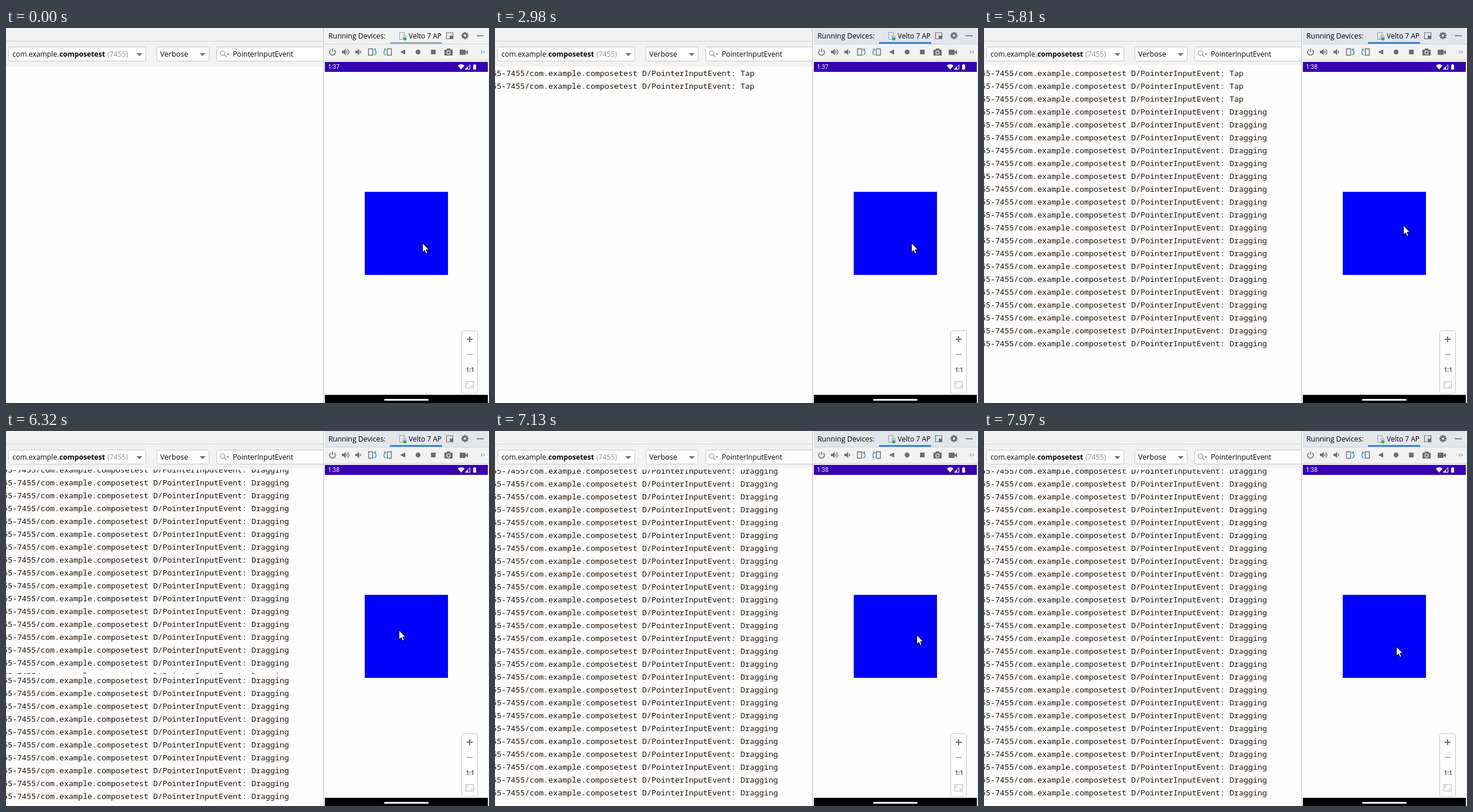
Write an HTML page with a canvas that moves like this. It is 824x641 px and loops after 8000 ms.

```html
<!DOCTYPE html>
<html lang="en">
<head>
<meta charset="utf-8">
<title>Pointer input log</title>
<style>
html, body { margin: 0; width: 100%; height: 100%; overflow: hidden; background: #f2f2f2; }
canvas { display: block; }
</style>
</head>
<body>
<canvas id="stage" width="824" height="641"></canvas>
<script>
const ctx = document.getElementById('stage').getContext('2d', { alpha: false });
const LOOP = 8000;
const UI = '"Open Sans", "Noto Sans", sans-serif';
const MONO = '13.333px "Noto Sans Mono", "DejaVu Sans Mono", monospace';
const GREY = '#6e6e6e', PALE = '#b8b8b8', BLUE = '#389fd6', LINE = '#d1d1d1';
const ROW = 22, LOG_TOP = 66, LOG_RIGHT = 541, BOTTOM = 641;
const FOCUS = 1370, DRAG = 5540;
const TAPS = [1770, 2980, 4340];

// Turning points of the pointer: time, tip x, tip y
const TURNS = [
  [5000, 710, 367], [5810, 715, 337], [6320, 670, 340], [6830, 706, 381],
  [7130, 719, 348], [7620, 676, 362], [7970, 703, 368]
];

// Screen updates come at three paces, on a 30 ms grid.
const snap = ms => 20 + 30 * Math.floor((ms - 20) / 30);
const pace = (from, step, count) => Array.from({ length: count }, (_, i) => snap(from + step * i));
const ticks = [...pace(5150, 135, 6), ...pace(5960, 120, 7), ...pace(6850, 143.3, 9)];

const tickIndex = t => ticks.filter(tick => tick <= t).length - 1;

function cursorAt(time) {
  const next = TURNS.findIndex(turn => turn[0] >= time);
  if (next === 0) return TURNS[0].slice(1);
  const [t0, x0, y0] = TURNS[next - 1], [t1, x1, y1] = TURNS[next];
  const k = (1 - Math.cos(Math.PI * (time - t0) / (t1 - t0))) / 2;
  return [Math.round(x0 + (x1 - x0) * k), Math.round(y0 + (y1 - y0) * k)];
}

function rect(x, y, w, h, color) {
  ctx.fillStyle = color;
  ctx.fillRect(x, y, w, h);
}
function text(str, x, y, font, color = '#000') {
  ctx.font = font;
  ctx.fillStyle = color;
  ctx.fillText(str, x, y);
}
function fill(d, color) {
  ctx.fillStyle = color;
  ctx.fill(new Path2D(d));
}
function path(d, color, width = 1.3) {
  ctx.strokeStyle = color;
  ctx.lineWidth = width;
  ctx.stroke(new Path2D(d));
}
function disc(x, y, r, color) {
  ctx.beginPath();
  ctx.arc(x, y, r, 0, Math.PI * 2);
  ctx.fillStyle = color;
  ctx.fill();
}
function arc(x, y, r, a, b, color, width = 1.3) {
  ctx.beginPath();
  ctx.arc(x, y, r, a, b);
  ctx.strokeStyle = color;
  ctx.lineWidth = width;
  ctx.stroke();
}
function field(x, y, w, h) {
  ctx.beginPath();
  ctx.roundRect(x + .5, y + .5, w - 1, h - 1, 3);
  ctx.fillStyle = '#fff';
  ctx.fill();
  ctx.strokeStyle = '#c4c4c4';
  ctx.lineWidth = 1;
  ctx.stroke();
}
const arrowDown = (x, y, r) => fill(`M${x - r} ${y} h${2 * r} l${-r} ${r} Z`, GREY);

function filterBar() {
  rect(0, 22, LOG_RIGHT, 1, LINE);
  field(4, 32, 235, 25);
  text('com.example.', 11, 49, '12.2px ' + UI);
  text('composetest', 91, 49, 'bold 12.2px ' + UI);
  text('(7455)', 173, 49, '12.2px ' + UI, '#8c8c8c');
  arrowDown(227.5, 43, 5);
  field(257, 32, 90, 25);
  text('Verbose', 263, 49, '12.6px ' + UI);
  arrowDown(335.5, 43, 5);
  field(359, 32, 200, 25);
  arc(369.5, 43, 4, 0, 7, '#8a8a8a', 1.2);
  path('M372.5 46 L376 49.5', '#8a8a8a', 1.4);
  arrowDown(378.5, 43.5, 2.5);
  text('PointerInputEvent', 387, 49, '12.2px ' + UI);
}

// Rows are placed by the middle of their text.
function logRows(first, last, top, bottom, taps = 0) {
  ctx.save();
  ctx.beginPath();
  ctx.rect(0, top, LOG_RIGHT, bottom - top);
  ctx.clip();
  for (let y = first, i = 0; y <= last; y += ROW, i++) {
    const kind = i < taps ? 'Tap' : 'Dragging';
    text('55-7455/com.example.composetest D/PointerInputEvent: ' + kind, -5, y + 5, MONO, '#1c1108');
  }
  ctx.restore();
}

function log(t) {
  const top = t < DRAG ? LOG_TOP : LOG_TOP - 3;
  rect(0, top, LOG_RIGHT, BOTTOM - top, '#fefefe');

  const taps = TAPS.filter(tap => tap <= t).length;
  const tick = tickIndex(t), dragTick = tickIndex(DRAG), fullTick = dragTick + 3;
  if (tick <= fullTick) {
    const count = tick < dragTick ? taps : 14 + 4 * (tick - dragTick);
    logRows(77, 77 + ROW * (count - 1), LOG_TOP, BOTTOM, taps);
    return;
  }
  const resting = (t >= 6830 && t < 7280) || t >= 7970;
  if (resting) {
    logRows(68, 618, LOG_TOP, BOTTOM);
    return;
  }
  // While scrolling, some repaints are torn: the lower part lags by 8 px.
  const first = LOG_TOP - (tick - 9 + ROW) * 7 % ROW;
  const tear = tick % 6 === 3 ? 415 : BOTTOM;
  logRows(first, BOTTOM + ROW, LOG_TOP, tear);
  logRows(first + 8, BOTTOM + ROW, tear, BOTTOM);
}

function speaker(x, waves) {
  fill(`M${x} 39 h3 l3.5 -3.5 v11 l-3.5 -3.5 h-3 Z`, GREY);
  for (let i = 0; i < waves; i++) arc(x + 6.5, 41, 2.5 + i * 3, -1, 1, GREY);
}

function rotateIcon(x, side) {
  ctx.save();
  ctx.translate(x, 41);
  ctx.scale(side, 1);
  path('M-6.5 -5.5 H0.5 V5.5 H-6.5 Z', GREY, 1.4);
  path('M3 5 Q7 4 6.3 -.5 Q6 -3 3.5 -4', BLUE, 1.5);
  fill('M2 -4 L5.8 -7 V-1.5 Z', BLUE);
  ctx.restore();
}

function gear(x, y) {
  for (let i = 0; i < 8; i++) {
    ctx.save();
    ctx.translate(x, y);
    ctx.rotate(i * Math.PI / 4);
    rect(-1.4, -6.2, 2.8, 3, GREY);
    ctx.restore();
  }
  arc(x, y, 3.4, 0, 7, GREY, 2.6);
}

function deviceHeader(active) {
  rect(544, 0, 278, 27, active ? '#e2e6ec' : '#f2f2f2');
  text('Running Devices:', 550, 18, '12.3px ' + UI);
  path('M678 19.5 H671.5 V7.5 H679.5 V13 M677.5 19.5 V13.5 H682.5 V16', '#9a9fa5', 1);
  disc(680.5, 18.5, 2.8, '#2fb344');
  text('Velto 7 AP', 687, 18, '12px ' + UI);
  rect(655, 24, 89, 3, active ? '#4083c9' : '#9ca9bb');
  path('M751.5 8 H762.5 V18.5 H751.5 Z', GREY, 1.2);
  rect(757, 13, 5, 5, GREY);
  gear(783, 13);
  rect(803, 12.5, 12, 1.6, GREY);
}

function deviceTools() {
  rect(544, 27, 280, 1, LINE);
  rect(544, 55, 280, 1, LINE);
  arc(557, 41.5, 5, -.9, Math.PI + .9, GREY, 1.6);
  rect(556.2, 35, 1.6, 6, GREY);
  speaker(573, 2);
  speaker(596, 1);
  rotateIcon(625, 1);
  rotateIcon(651, -1);
  fill('M672.5 41 L681 36.5 V45.5 Z', GREY);
  disc(703, 41, 4.2, GREY);
  rect(725, 37, 8, 8, GREY);
  rect(748, 37, 14, 10, GREY);
  rect(752, 35, 6, 3, GREY);
  arc(755, 42, 2.8, 0, 7, '#f2f2f2', 1.2);
  rect(774, 37, 10, 9, GREY);
  fill('M783 41.5 L788 37.5 V45.5 Z', GREY);
  path('M810 38.5 l2.5 2.5 l-2.5 2.5 M814 38.5 l2.5 2.5 l-2.5 2.5', GREY, 1);
}

function phone(t) {
  rect(544, 58, 278, 583, '#fefefe');
  rect(544, 58, 278, 17, '#3700b0');
  text(t < DRAG ? '1:37' : '1:38', 549.5, 70, '10px Roboto, sans-serif', '#fff');
  fill('M776.5 71 L770.8 64.3 Q776.5 59.8 782.2 64.3 Z', '#fff');
  path('M783.8 70.5 L791.5 62.8 V70.5 Z', '#fff', 1);
  fill('M783 71 L788 66 V71 Z', '#fff');
  rect(797, 63, 5, 8, '#fff');
  rect(798.3, 62, 2.4, 1, '#fff');
  rect(612, 280, 142, 142, '#00f');
  rect(544, 627, 278, 14, '#000');
  ctx.beginPath();
  ctx.roundRect(645, 634, 76, 3, 1.5);
  ctx.fillStyle = '#fff';
  ctx.fill();
}

function zoomPanel() {
  field(777, 517, 28, 108);
  rect(786, 531, 10, 2, GREY);
  rect(790, 527, 2, 10, GREY);
  rect(786, 557, 10, 2, PALE);
  text('1:1', 784.5, 588, 'bold 10px ' + UI, '#5e5e5e');
  path('M784.5 604.5 H797.5 V615.5 H784.5 Z', PALE, 1.2);
  path('M787 609.5 V607 H789.5 M795 610.5 V613 H792.5', PALE, 1);
}

function cursor(x, y) {
  const shape = 'M.5 .5 V16.5 L4.1 13 L6.6 18.5 L9.2 17.4 L6.8 12 H11.5 Z';
  ctx.save();
  ctx.translate(x, y);
  fill(shape, '#fff');
  path(shape, '#000', 1);
  ctx.restore();
}

function draw(now) {
  const t = now % LOOP;
  rect(0, 0, 824, BOTTOM, '#f2f2f2');
  filterBar();
  log(t);
  rect(LOG_RIGHT, 0, 283, BOTTOM, '#f2f2f2');
  rect(LOG_RIGHT, 0, 1, BOTTOM, '#c4c4c4');
  deviceHeader(t >= FOCUS);
  deviceTools();
  phone(t);
  zoomPanel();
  cursor(...cursorAt(ticks[tickIndex(t)] ?? 0));
}

const start = performance.now();
function tick() {
  draw(performance.now() - start);
  requestAnimationFrame(tick);
}
tick();
</script>
</body>
</html>
```
